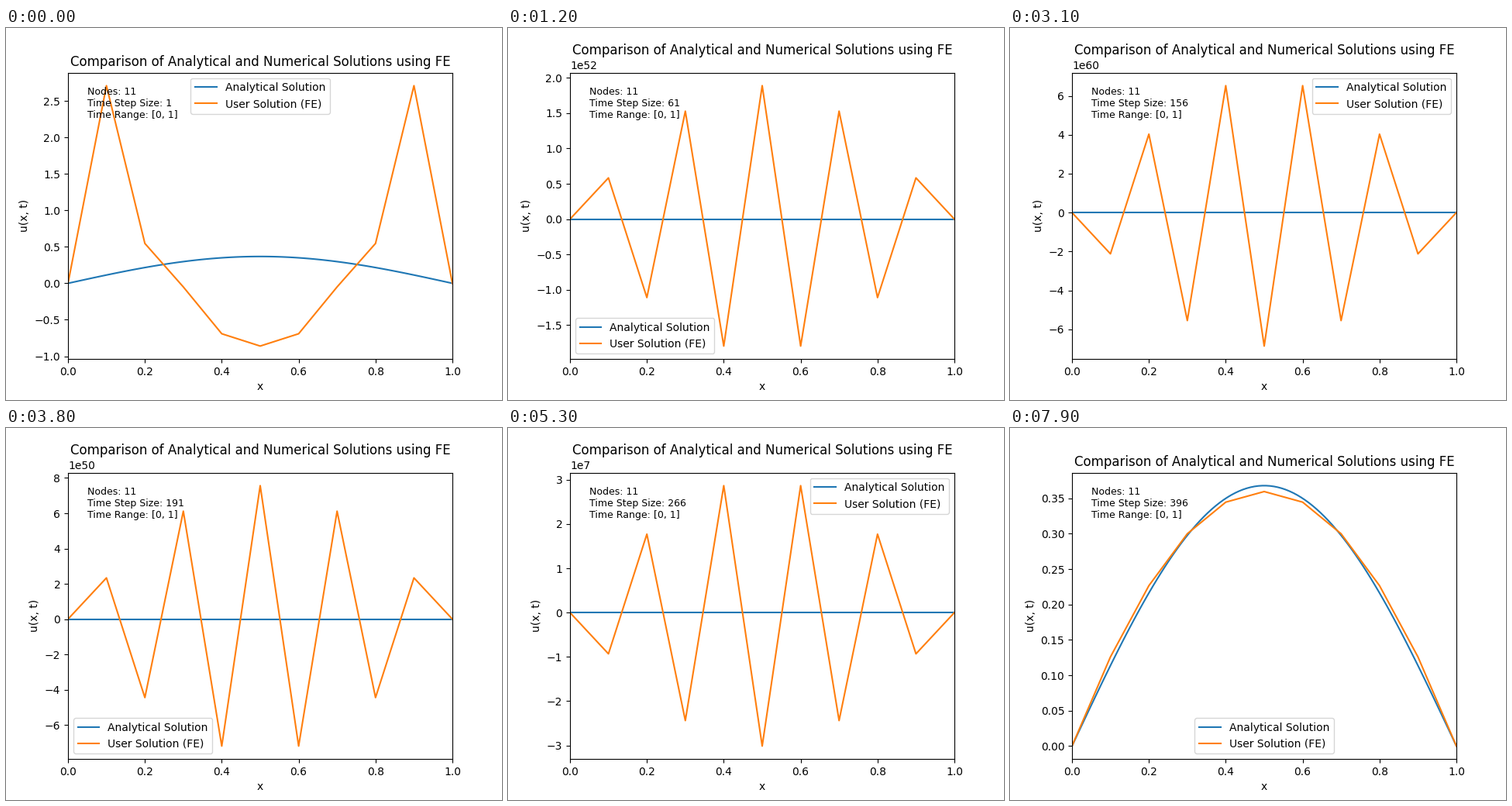
Animation of 640x480 px, one loop 8 s. Source, as a matplotlib script:

```python
import matplotlib.pyplot as plt
import numpy as np
from matplotlib.animation import FuncAnimation

NODES = 11
FRAMES = 80
STRIDE = 5

x = np.linspace(0, 1, NODES)
h = x[1] - x[0]
fine = np.linspace(0, 1, 100)
exact = np.exp(-1) * np.sin(np.pi * fine)


def tridiag(main, side):
    k = NODES - 2
    return main * np.eye(k) + side * (np.eye(k, k=1) + np.eye(k, k=-1))


# Linear elements on the interior nodes; both ends are held at zero.
mass = tridiag(4, 1) * h / 3
stiff = tridiag(2, -1) / h
gauss = 1 / np.sqrt(3)
source = 0.625 * (np.pi**2 - 1) * np.sin(np.pi * gauss) * gauss
load = np.linalg.solve(mass, np.full(NODES - 2, 2 * h * source))
decay = np.linalg.solve(mass, stiff)


def forward_euler(steps):
    dt = 1 / steps
    u = np.sin(np.pi * x)
    u[[0, -1]] = 0
    inner = u[1:-1]
    for k in range(steps):
        inner = inner + dt * (load * np.exp(-k * dt) - decay @ inner)
        inner = (inner + inner[::-1]) / 2
    u[1:-1] = inner
    return u


fig, ax = plt.subplots(figsize=(6.4, 4.8), dpi=100)


def draw(i):
    steps = 1 + STRIDE * i
    ax.clear()
    ax.plot(fine, exact, label="Analytical Solution")
    ax.plot(x, forward_euler(steps), label="User Solution (FE)")
    ax.set_xlim(0, 1)
    ax.set_xlabel("x")
    ax.set_ylabel("u(x, t)")
    ax.set_title("Comparison of Analytical and Numerical Solutions using FE")
    ax.text(0.05, 0.95,
            f"Nodes: {NODES}\nTime Step Size: {steps}\nTime Range: [0, 1]",
            transform=ax.transAxes, fontsize=9, va="top")
    ax.legend(loc="best")
    return []


anim = FuncAnimation(fig, draw, frames=FRAMES, interval=100,
                     init_func=lambda: [], repeat=True, repeat_delay=0)
plt.show()
```
